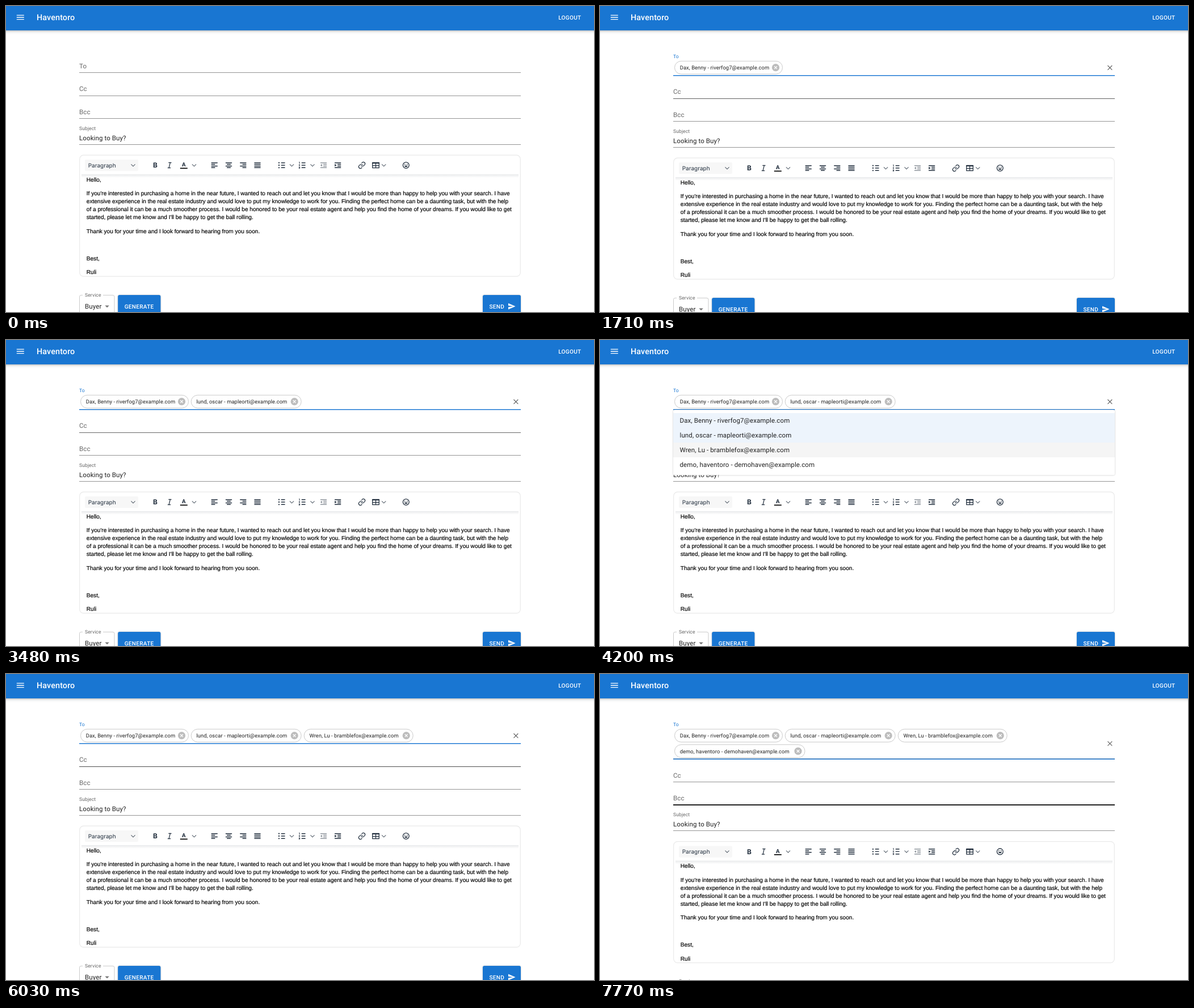
An HTML page for the animation above (8 s loop, 1036 px wide and 540 px high).

```html
<!DOCTYPE html>
<html lang="en">
<head>
<meta charset="utf-8">
<title>Compose mail</title>
<style>
html, body { margin: 0; width: 1036px; height: 540px; overflow: hidden; background: #fff; }
svg { display: block; }
text { font: 11.51px Roboto, sans-serif; letter-spacing: .00938em; fill: rgba(0,0,0,.87); text-rendering: geometricPrecision; white-space: pre; }
.label { fill: rgba(0,0,0,.6); }
.small { font-size: 8.63px; }
.chip { font-size: 9.35px; }
.title { font-size: 14.39px; font-weight: 500; letter-spacing: .0075em; fill: #fff; }
.button { font-size: 10.07px; font-weight: 500; letter-spacing: .02857em; fill: #fff; }
.mail { font: 10.07px "Liberation Sans", Arial, sans-serif; letter-spacing: 0; font-kerning: none; fill: #000; stroke: #000; stroke-width: .18px; }
.tool { font: 10px Inter, sans-serif; letter-spacing: 0; fill: #222f3e; }
.heavy { font: bold 16.5px Inter, sans-serif; letter-spacing: 0; fill: #222f3e; stroke: none; text-anchor: middle; }
.line { shape-rendering: crispEdges; }
.icon { fill: none; stroke: #222f3e; stroke-width: 2; stroke-linecap: round; stroke-linejoin: round; }
.icon .solid { fill: #222f3e; stroke: none; }
.raised { filter: drop-shadow(0 .9px .8px rgba(0,0,0,.16)) drop-shadow(0 .6px 1.2px rgba(0,0,0,.12)); }
.bar { filter: drop-shadow(0 1.2px 1.4px rgba(0,0,0,.18)) drop-shadow(0 1.4px 3px rgba(0,0,0,.18)); }
</style>
</head>
<body>
<svg id="stage" width="1036" height="540" viewBox="0 0 1036 540"></svg>
<script>
const LOOP = 8000, BLUE = '#1976d2', ZOOM = .7194;
const people = [
  'Dax, Benny - riverfog7@example.com',
  'lund, oscar - mapleorti@example.com',
  'Wren, Lu - bramblefox@example.com',
  'demo, haventoro - demohaven@example.com'
];
const mail = [
  [0, 'Hello,'],
  [24.17, "If you're interested in purchasing a home in the near future, I wanted to reach out and let you know that I would be more than happy to help you with your search. I have"],
  [38.27, 'extensive experience in the real estate industry and would love to put my knowledge to work for you. Finding the perfect home can be a daunting task, but with the help'],
  [52.37, 'of a professional it can be a much smoother process. I would be honored to be your real estate agent and help you find the home of your dreams. If you would like to get'],
  [66.47, "started, please let me know and I'll be happy to get the ball rolling."],
  [90.64, 'Thank you for your time and I look forward to hearing from you soon.'],
  [138.98, 'Best,'],
  [163.15, 'Ruli']
];

// Timeline, in ms
const picks = [1710, 3120, 4500, 7320];
const openings = [[1110, 1710], [2310, 3120], [3720, 4500], [6330, 7320]];
const pointed = [[1290, 0], [1710, -1], [2460, 1], [3120, -1], [3840, 2], [4500, -1], [6390, 3], [7320, -1]];
const carets = [[1080, 1500], [1740, 2250], [2760, 3270], [3720, 4200], [4560, 5040], [5520, 6030], [6390, 6900], [7350, 7770]];
const mailCarets = [[30, 540], [1050, 1080]];
const hovers = {
  to: [[780, 1050]],
  cc: [[1620, 2160], [3210, 3360], [5910, 6030]],
  bcc: [[4500, 4920], [7320, LOOP]]
};
const FOCUS = 1050, FADE = 200;

const text = (x, y, s, cls = '') => `<text x="${x}" y="${y}" class="${cls}">${s}</text>`;
const rect = (x, y, w, h, fill, more = '') => `<rect x="${x}" y="${y}" width="${w}" height="${h}" fill="${fill}" ${more}/>`;
const path = (d, more = '') => `<path d="${d}" ${more}/>`;
const icon = (x, inner, more = '', size = ZOOM) =>
  `<g class="icon" transform="translate(${x} 281) scale(${size}) translate(-12 -12)" ${more}>${inner}</g>`;
const chevron = x => icon(x, path('M7.5 10l4.5 4.5 4.5-4.5'), 'style="stroke-width:1.5;opacity:.75"');
const lines = (x, w) => path(`M5 6h14M${x} 10h${w}M5 14h14M${x} 18h${w}`);
const cross = (x, y, r, color, w) =>
  path(`M${x - r} ${y - r}l${2 * r} ${2 * r}m0 ${-2 * r}l${-2 * r} ${2 * r}`, `stroke="${color}" stroke-width="${w}"`);
const underline = (id, y) => rect(129, y, 778, 1, '#000', `id="${id}" class="line" opacity=".42"`);

function chip(name, i) {
  const [x, w] = [[131.5, 190], [326.2, 194], [525.2, 192], [131.5, 229.5]][i];
  const y = i < 3 ? 97.3 : 124.7, cx = x + w - 12, cy = y + 11.4;
  return `<g class="pick">` +
    rect(x, y, w, 22.8, '#fff', 'rx="11.4" stroke="#bdbdbd" stroke-width=".8"') +
    text(x + 9.2, y + 14.8, name, 'chip') +
    `<circle cx="${cx}" cy="${cy}" r="6.6" fill="#bdbdbd"/>` + cross(cx, cy, 2.4, '#fff', 1.3) + '</g>';
}

const outdent = 'M5 6h14M12 10h7M12 14h7M5 18h14';
const toolbar =
  rect(139, 271, 94, 20.3, '#f7f7f7', 'rx="2.2"') + text(144.7, 284.7, 'Paragraph', 'tool') +
  [224, 331.5, 503.5, 540, 665.7].map(chevron).join('') +
  icon(263, text(12, 18, 'B', 'heavy')) +
  icon(288.2, path('M10 5.5h6M8 18.5h6M13.6 5.5l-3.2 13', 'style="stroke-width:1.7"')) +
  icon(313.3, '<text x="12" y="15" class="heavy" style="font-size:13px">A</text>' + path('M3 18.3h18v2.4H3z', 'style="fill:#000;stroke:none"')) +
  icon(367.2, lines(5, 8)) + icon(392.5, lines(8, 8)) + icon(417.8, lines(11, 8)) + icon(443, lines(5, 14)) +
  icon(486, path('M11 6h8M11 12h8M11 18h8') + path('M5 6h.01M5 12h.01M5 18h.01', 'style="stroke-width:3.2"')) +
  icon(522, path('M11 6h8M11 12h8M11 18h8') + path('M4.3 4.5l1-.6v4M4 10.5h2l-2 3h2M4 16.5h2v3H4m0-1.5h2', 'style="stroke-width:1.2"')) +
  icon(559.5, path(outdent) + path('M8.5 9L4 12l4.5 3z', 'class="solid"'), 'opacity=".5"') +
  icon(584.6, path(outdent) + path('M4.5 9L9 12l-4.5 3z', 'class="solid"')) +
  icon(627, path('M10 13a5 5 0 0 0 7.5.5l3-3a5 5 0 0 0-7-7l-1.7 1.7M14 11a5 5 0 0 0-7.5-.5l-3 3a5 5 0 0 0 7 7l1.7-1.7'), '', .59) +
  icon(651.5, path('M4 5.5h16v13H4zM4 13h16M12 6v12', 'style="stroke-width:1.8"') + path('M4 6.5h16', 'style="stroke-width:2.6"')) +
  icon(704.8, '<circle cx="12" cy="12" r="7.5" style="stroke-width:1.8"/>' +
    path('M9.3 10h.01M14.7 10h.01', 'style="stroke-width:2.4"') + path('M7.8 13a4.3 4.3 0 0 0 8.4 0z', 'class="solid"'));

const form =
  underline('to', 117) +
  text(129, 150.3, 'Cc', 'label') + underline('cc', 157.7) +
  text(129, 190.7, 'Bcc', 'label') + underline('bcc', 198) +
  text(129, 218.6, 'Subject', 'label small') + text(129, 237, 'Looking to Buy?') + underline('subject', 244) +
  rect(129.7, 263.2, 776.6, 214, '#fff', 'rx="7" stroke="#e9e9e9" stroke-width="1.2"') +
  rect(133, 297, 770, 6, 'url(#shade)') + toolbar +
  mail.map(([y, s]) => text(141.8, 310 + y, s, 'mail')).join('') +
  rect(158, 464, 1, 12, '#000', 'id="mailCaret"') +
  path('M135 510.3h-2.6a2.9 2.9 0 0 0-2.9 2.9v34.5a2.9 2.9 0 0 0 2.9 2.9h55.7a2.9 2.9 0 0 0 2.9-2.9v-34.5a2.9 2.9 0 0 0-2.9-2.9H171',
    'fill="none" stroke="#c4c4c4" stroke-width=".9"') +
  text(139, 512.9, 'Service', 'label small') + text(139, 534, 'Buyer') +
  path('M174.4 528.5h7.4l-3.7 3.7z', 'fill="rgba(0,0,0,.54)"') +
  rect(197.2, 510, 75.2, 40, BLUE, 'rx="2.9" class="raised"') + text(208.7, 533.7, 'GENERATE', 'button') +
  rect(840, 510, 67, 40, BLUE, 'rx="2.9" class="raised"') + text(851.4, 533.7, 'SEND', 'button') +
  path('M2 21L23 12 2 3v7l15 2-15 2z', 'fill="#fff" transform="translate(883.8 522.8) scale(.6)"') +
  rect(129, 117, 778, 1.44, BLUE, 'id="focus"');

const menu = rect(129, 118.2, 778, 115.4, '#fff', 'rx="2.9" class="raised"') +
  people.map((name, i) => {
    const y = 124 + 25.9 * i;
    return rect(129, y, 778, 25.9, '#fff', 'class="row line"') + text(140.5, y + 17.1, name);
  }).join('');

const stage = document.getElementById('stage');
stage.innerHTML =
  '<defs><linearGradient id="shade" x2="0" y2="1"><stop stop-color="#222f3e" stop-opacity=".1"/>' +
  '<stop offset="1" stop-color="#222f3e" stop-opacity="0"/></linearGradient></defs>' +
  `<g id="form">${form}</g>` +
  '<text id="toLabel" x="129">To</text>' + people.map(chip).join('') +
  `<g id="clear">${cross(898.4, 108.9, 3.9, '#666', 1.2)}</g>` +
  rect(0, 0, 1, 14, '#111', 'id="caret"') +
  `<g id="menu">${menu}</g>` +
  rect(-10, -10, 1056, 53, BLUE, 'class="bar"') +
  path('M18.8 16.4h13M18.8 20h13M18.8 23.6h13', 'stroke="#fff" stroke-width="1.44"') +
  text(54, 25, 'Haventoro', 'title') + text(973.2, 23.7, 'LOGOUT', 'button');

const el = id => document.getElementById(id);
const set = (node, attrs) => { for (const k in attrs) node.setAttribute(k, attrs[k]); };
const show = (node, on) => set(node, { visibility: on ? 'visible' : 'hidden' });
const clamp = v => Math.min(1, Math.max(0, v));
const easeOut = v => 1 - (1 - clamp(v)) ** 3;
const within = (spans, t) => spans.some(([a, b]) => t >= a && t < b);
const chips = [...document.querySelectorAll('.pick')];
const rows = [...document.querySelectorAll('.row')];

function draw(t) {
  const count = picks.filter(p => t >= p).length;
  const dy = count === 0 ? 0 : count < 4 ? 5 : 32.4;
  const move = `translate(0 ${dy})`;
  set(el('form'), { transform: move });
  set(el('menu'), { transform: move });
  show(el('menu'), within(openings, t));

  const focus = easeOut((t - FOCUS) / FADE);
  set(el('focus'), { x: 518 - 389 * focus, width: 778 * focus });
  set(el('toLabel'), {
    y: 110 - 17.9 * focus,
    style: `font-size:${11.51 - 2.88 * focus}px;fill:${t < FOCUS ? 'rgba(0,0,0,.6)' : BLUE}`
  });

  for (const id in hovers) {
    const level = Math.max(...hovers[id].map(([a, b]) => Math.min(clamp((t - a) / FADE), 1 - clamp((t - b) / FADE))));
    set(el(id), { opacity: .42 + .45 * level, height: 1 + .44 * level });
  }

  chips.forEach((c, i) => show(c, i < count));
  show(el('clear'), count > 0);
  set(el('clear'), { transform: `translate(0 ${count === 4 ? 13.9 : 0})` });

  const under = pointed.reduce((last, [at, row]) => t >= at ? row : last, -1);
  rows.forEach((r, i) => set(r, { fill: i < count ? '#edf4fc' : i === under ? '#f5f5f5' : '#fff' }));

  set(el('caret'), { x: [129, 324, 523, 719, 363][count], y: count === 0 ? 99 : count < 4 ? 102 : 129 });
  show(el('caret'), within(carets, t));
  show(el('mailCaret'), within(mailCarets, t));
}

function tick() {
  draw(performance.now() % LOOP);
  requestAnimationFrame(tick);
}
tick();
</script>
</body>
</html>
```
